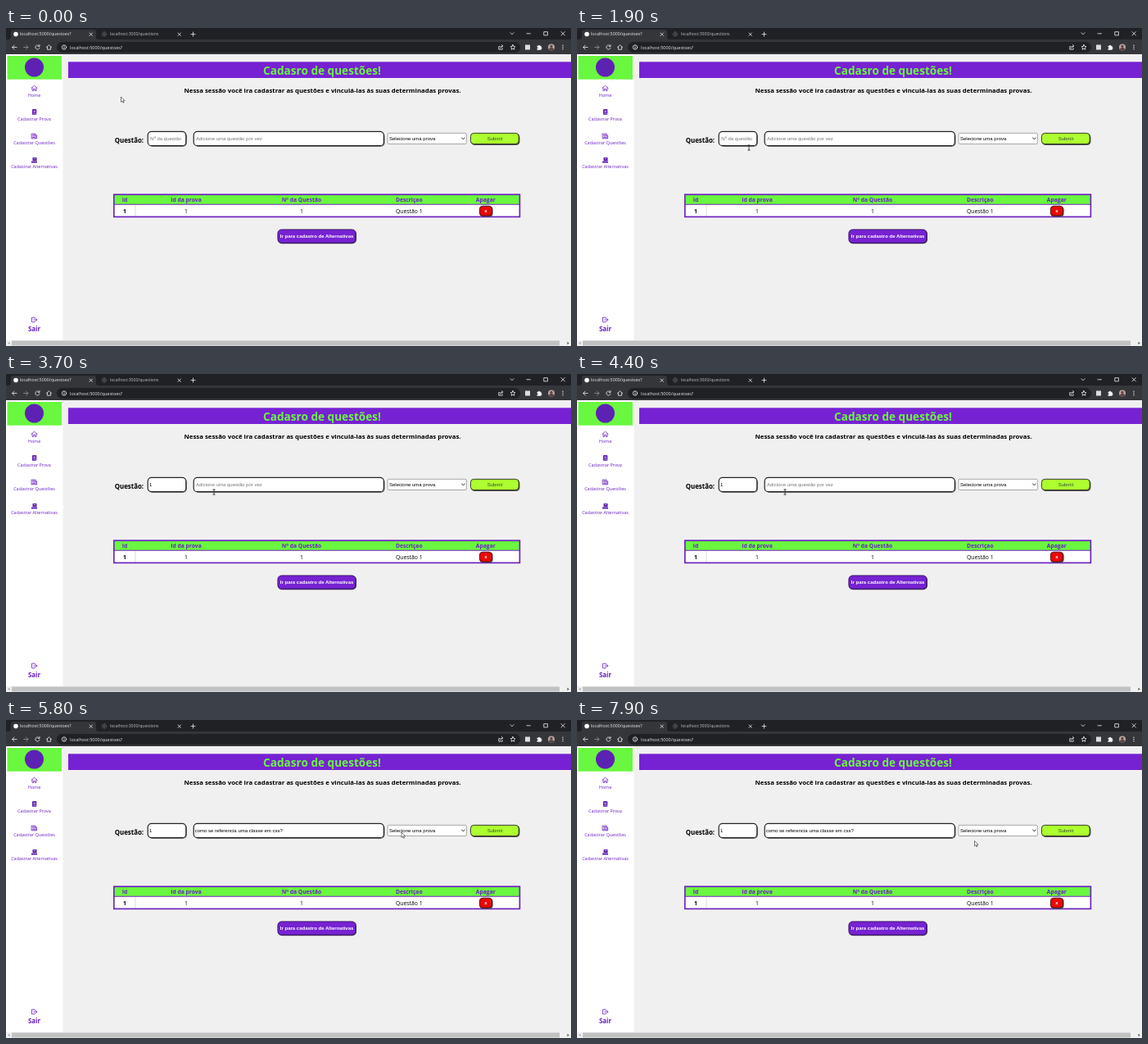
These frames come from a looping animation (690 px wide and 388 px high, 8 s). An HTML page:

```html
<!DOCTYPE html>
<html lang="pt">
<head>
<meta charset="utf-8">
<style>
html, body { margin: 0; width: 100%; height: 100%; overflow: hidden; background: #f1f0f1 }
svg { display: block; width: 690px; height: 388px; font-family: "Open Sans", "Noto Sans", sans-serif }
.form { font: 6px "Liberation Sans", Arial, sans-serif }
.mid { text-anchor: middle }
.bold { font-weight: 700 }
.hint { fill: #757575 }
.line { fill: none; stroke-linecap: round; stroke-linejoin: round }
</style>
</head>
<body>
<svg viewBox="0 0 690 388">
  <!-- browser -->
  <rect width="690" height="32" fill="#35363a"/>
  <rect width="690" height="14" fill="#202124"/>
  <path d="M3 14Q6 14 6 11V5Q6 2 9 2H107Q110 2 110 5V11Q110 14 113 14Z" fill="#35363a"/>
  <rect x="62" y="17" width="566" height="13" rx="6.5" fill="#202124"/>
  <circle cx="12" cy="7.5" r="2.8" fill="#fff"/>
  <g font-size="5.3" fill="#e8eaed">
    <text x="17" y="9.4">localhost:5000/questoes?</text>
    <text x="127" y="9.4" font-size="5.1" fill="#bdc1c6">localhost:3000/questions</text>
    <text x="78" y="25.5" font-size="5.45">localhost:5000/questoes?</text>
  </g>
  <g class="line" stroke="#55575b" stroke-width=".7">
    <circle cx="120" cy="7.5" r="2.7"/><path d="M117.3 7.5H122.7M120 4.8Q117.6 7.5 120 10.2Q122.4 7.5 120 4.8"/>
  </g>
  <g class="line" stroke="#dadce0" stroke-width=".9">
    <path d="M102 6l3.4 3.4m0-3.4l-3.4 3.4M210 6l3.4 3.4m0-3.4l-3.4 3.4M226 7.6h5M228.5 5.1v5"/>
    <path d="M616 5.8l2 2l2-2M636 6.8h4.4M657.2 4.7h4.2v4.2h-4.2zM678 4.6l4.4 4.4m0-4.4l-4.4 4.4"/>
    <path d="M13 23.5H7.6m2.5-2.5l-2.5 2.5l2.5 2.5"/>
    <path d="M21.6 23.5H27m-2.5-2.5l2.5 2.5l-2.5 2.5" stroke="#8b8d91"/>
    <path d="M40.4 21.7A2.6 2.6 0 1 0 41 24.2M41 20.5v1.9h-1.9"/>
    <path d="M49.5 23.4l3-2.6l3 2.6M50.4 23v3.2h4.2V23"/>
    <circle cx="71" cy="23.5" r="2.7"/><path d="M71 23.3v1.4M71 22v.1"/>
    <path d="M603 22.5h-1.2v3.6h4.4v-1.3M603.5 24.3q.2-2.4 3.2-2.4m-1.3-1.4l1.4 1.4l-1.4 1.4"/>
    <path d="M619 20.4l.9 2l2.1.2l-1.6 1.5l.5 2.2l-1.9-1.2l-1.9 1.2l.5-2.2l-1.6-1.5l2.1-.2z"/>
  </g>
  <rect x="634" y="20.5" width="6" height="6" fill="#dcdde0"/>
  <path d="M648.5 21.7h1.5a1 1 0 0 1 2 0h1.6v1.7a1 1 0 0 1 0 2v1.4h-5.1v-1.5a1 1 0 0 0 0-2z" fill="#f1f3f4"/>
  <circle cx="666" cy="23.5" r="4" fill="#b9a7a2"/>
  <path d="M663 26.2q0-2.2 3-2.2t3 2.2a4 4 0 0 1-6 0z" fill="#59413f"/>
  <circle cx="666" cy="22.3" r="1.6" fill="#59413f"/>
  <g fill="#e8eaed"><circle cx="680" cy="21.2" r=".7"/><circle cx="680" cy="23.5" r=".7"/><circle cx="680" cy="25.8" r=".7"/></g>

  <!-- sidebar -->
  <rect y="32" width="69.5" height="349" fill="#fff"/>
  <rect x="1.5" y="34" width="66.5" height="28.7" fill="#6af73f"/>
  <circle cx="34.5" cy="48" r="11.5" fill="#5d22b4"/>
  <g class="mid" font-size="5.5" fill="#6a20c4">
    <text x="34.5" y="83.5">Home</text>
    <text x="34.5" y="112.5">Cadastrar Prova</text>
    <text x="34.5" y="141.7">Cadastrar Questões</text>
    <text x="34.5" y="170.7">Cadastrar Alternativas</text>
    <text x="34.5" y="370" class="bold" font-size="7.9">Sair</text>
  </g>
  <g class="line" stroke="#6a20c4" stroke-width=".8">
    <path d="M31 73.3l3.5-3.1l3.5 3.1M32 72.7v3.7h1.7v-2.2h1.6v2.2H37v-3.7"/>
    <path d="M31.5 129h4.6v5.8h-4.6zM36.1 131h1.5v3.8h-1.5M32.6 130.5h2.4M32.6 132h2.4M32.6 133.5h2.4"/>
    <path d="M35.2 354v-.8h-3.7v5.6h3.7v-.8M33.7 356h4.1m-1.4-1.5l1.5 1.5l-1.5 1.5"/>
  </g>
  <g fill="#5a1cb0">
    <rect x="32" y="99" width="5.3" height="7" rx="1"/>
    <path d="M32.5 158h5v4h-5zM31 162.4h7v2h-7z"/>
  </g>
  <path d="M33.3 101h2.8M33.3 102.5h2.8M33 104.8h4M33.8 159.5h2.4" stroke="#fff" stroke-width=".6"/>

  <!-- page -->
  <rect x="76" y="41.3" width="614" height="19.7" fill="#7622d2"/>
  <text x="386" y="56.7" class="mid bold" font-size="13.6" fill="#6af73f">Cadasro de questões!</text>
  <text x="386.5" y="79.3" class="mid bold" font-size="7.8">Nessa sessão você ira cadastrar as questões e vinculá-las às suas determinadas provas.</text>
  <text x="132.7" y="140.3" class="bold" font-size="7.9">Questão:</text>

  <g fill="#858585">
    <rect x="174" y="127.3" width="47" height="17.7" rx="5"/>
    <rect x="230" y="127.3" width="232.7" height="17.7" rx="5"/>
  </g>
  <g fill="#fff" stroke="#242424" stroke-width="1.2">
    <rect x="173.2" y="126.3" width="46.6" height="17.4" rx="4.5"/>
    <rect x="229.2" y="126.3" width="232.2" height="17.4" rx="4.5"/>
    <rect x="466" y="128.3" width="96.3" height="13.2" rx="1.5" stroke="#858585" stroke-width=".7"/>
  </g>
  <path d="M556.6 134l1.7 1.7l1.7-1.7" class="line" stroke="#222" stroke-width="1"/>
  <rect x="568" y="129" width="59.5" height="14" rx="4.5" fill="#555"/>
  <rect x="567.4" y="128.3" width="58.8" height="13.3" rx="4" fill="#adff2f" stroke="#222" stroke-width=".9"/>
  <g class="form">
    <text id="number" x="175" y="137"/>
    <text id="question" y="137"/>
    <text x="468" y="137">Selecione uma prova</text>
    <text x="597" y="137" class="mid" fill="#334b33">Submit</text>
  </g>
  <rect id="caret" y="131" width=".7" height="8"/>

  <rect x="132" y="203" width="495.3" height="27.5" fill="#fff"/>
  <rect x="132" y="203" width="495.3" height="12" fill="#6af73f"/>
  <path d="M158 216v14" stroke="#ccc" stroke-width=".7"/>
  <path d="M132 215.2h495" stroke="#6b25bd" stroke-width="1.1"/>
  <rect x="131.8" y="203.2" width="495.6" height="27.2" fill="none" stroke="#6b25bd" stroke-width="1.7"/>
  <g class="mid bold" font-size="6.75" fill="#6a20c4">
    <text x="145" y="212">Id</text>
    <text x="220" y="212">Id da prova</text>
    <text x="361" y="212">Nº da Questão</text>
    <text x="492.3" y="212">Descriçao</text>
    <text x="585.8" y="212">Apagar</text>
  </g>
  <g class="mid" font-size="6.85">
    <text x="145" y="225.8" class="bold">1</text>
    <text x="220" y="225.8">1</text>
    <text x="361" y="225.8">1</text>
    <text x="492.3" y="225.8">Questão 1</text>
  </g>
  <rect x="578.6" y="217.8" width="16" height="12.4" rx="4" fill="#555"/>
  <rect x="578.3" y="217.2" width="15.2" height="11.9" rx="3.7" fill="#e90707" stroke="#301010" stroke-width=".8"/>
  <text x="586" y="225" class="form mid bold" fill="#fff">x</text>
  <rect x="332" y="246.3" width="96" height="17" rx="5" fill="#444"/>
  <rect x="331.9" y="245.9" width="95.2" height="16.4" rx="4.7" fill="#7622d2" stroke="#32105c" stroke-width=".9"/>
  <text x="379.6" y="256.2" class="form mid bold" fill="#fff">Ir para cadastro de Alternativas</text>

  <!-- scrollbar -->
  <rect y="381" width="690" height="7" fill="#f1f1f1"/>
  <rect x="7" y="381.5" width="669" height="6" fill="#c1c1c1"/>
  <path d="M4.5 382.7v3.6l-2.2-1.8z" fill="#a3a3a3"/>
  <path d="M685.5 382.7v3.6l2.2-1.8z" fill="#505050"/>

  <path id="arrow" d="M0 0V6.3L1.5 5L2.5 7.2L3.5 6.8L2.6 4.7H4.6Z" fill="#fff" stroke="#222" stroke-width=".6"/>
  <path id="beam" class="line" d="M-1.2-3H1.2M0-3V3M-1.2 3H1.2" stroke="#222" stroke-width=".8"/>
</svg>
<script>
const LOOP = 8000, STEP = 100;
const [arrow, beam, caret, number, question] =
  ["arrow", "beam", "caret", "number", "question"].map(id => document.getElementById(id));

// time, x, y of the pointer
const path = [
  [0, 140.5, 84], [600, 574, 218], [700, 574, 218], [800, 582, 221], [900, 305, 197],
  [1600, 219, 162], [1900, 210, 146], [2300, 210, 146], [2600, 209, 144],
  [3200, 209, 144], [3700, 254, 144], [5400, 254, 144], [5800, 483, 137],
  [6100, 486, 138], [7500, 486, 138], [7900, 485.5, 147.5]
];
// from, to, x of the text caret
const carets = [
  [2800, 3300, 178.6], [3800, 4400, 231], [4900, 5200, 231],
  [5200, 5800, 337.6], [6300, 6800, 337.6], [7300, 7800, 337.6]
];

function pointerAt(t) {
  const i = path.findIndex(p => p[0] > t);
  if (i < 0) return path[path.length - 1].slice(1);
  const [a, b] = [path[i - 1], path[i]], k = (t - a[0]) / (b[0] - a[0]);
  return [a[1] + (b[1] - a[1]) * k, a[2] + (b[2] - a[2]) * k];
}

function show(el, on) { el.setAttribute("visibility", on ? "visible" : "hidden"); }

function fill(el, typed, value, hint) {
  el.textContent = typed ? value : hint;
  el.classList.toggle("hint", !typed);
}

function draw(now) {
  const t = Math.floor(now % LOOP / STEP) * STEP;
  const [x, y] = pointerAt(t), overField = t >= 1900 && x < 463;
  for (const el of [arrow, beam]) {
    el.setAttribute("transform", `translate(${x} ${y})`);
    show(el, (el === beam) === overField);
  }

  fill(number, t >= 2800, "1", "Nº da questão");
  number.setAttribute("x", t >= 2800 ? 175 : 176.3);
  fill(question, t >= 5200, "como se referencia uma classe em css?", "Adicione uma questão por vez");
  question.setAttribute("x", t >= 5200 ? 230.7 : 232);

  const blink = carets.find(c => t >= c[0] && t < c[1]);
  show(caret, blink);
  if (blink) caret.setAttribute("x", blink[2]);
  requestAnimationFrame(() => draw(performance.now()));
}
draw(0);
</script>
</body>
</html>
```
